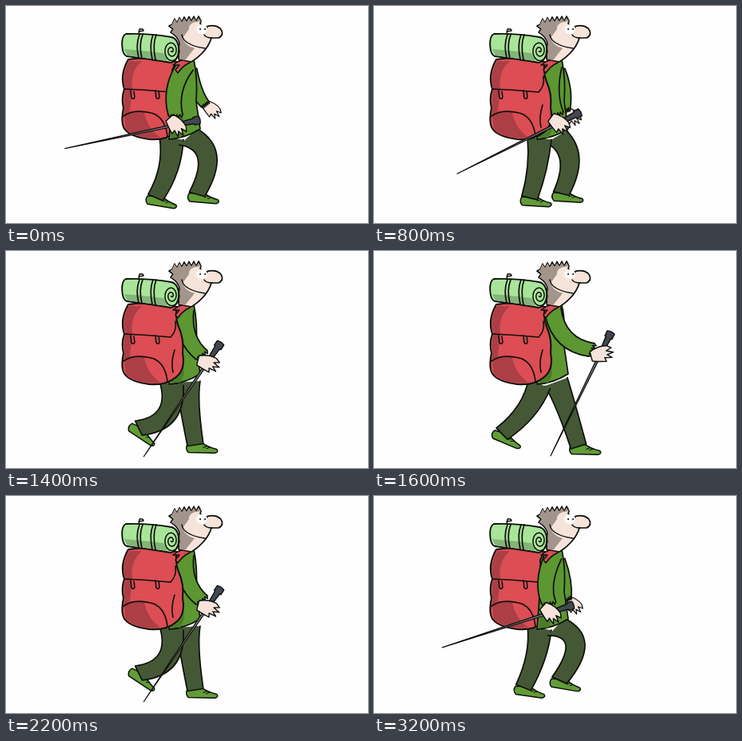
These frames come from a looping animation (453 by 272 pixels, 3400 ms). An HTML page with a canvas:

```html
<!DOCTYPE html>
<html lang="en">
<head>
<meta charset="utf-8">
<title>Hiker</title>
<style>
html, body { margin: 0; width: 100%; height: 100%; overflow: hidden; background: #fefefe; }
canvas { display: block; width: 453px; height: 272px; }
</style>
</head>
<body>
<canvas id="stage" width="453" height="272"></canvas>
<script>
const g = document.getElementById('stage').getContext('2d');
const INK = '#0d0f0b', SKIN = '#f6e4da', SHIRT = '#5c9731', SHADE = '#4a7c28',
  CLOTH = '#445836', SHOE = '#619d36', RED = '#dc4d54', DARK_RED = '#ab3f45',
  MINT = '#a9e599', DARK_MINT = '#83b478', HAIR = '#a3958b';
const RAD = Math.PI / 180, POLE = 171, GRIP = 29;

// Key poses. Legs: knee and ankle. Pole: top end and slope in degrees.
const poses = [
  { back: [203,204, 187,240], front: [252,190, 239,236], elbow: [211,106], pole: [241,143, 12] },
  { back: [203,203, 187,240], front: [256,190, 260,237], elbow: [214,107], pole: [246,139, 16] },
  { back: [202,202, 187,240], front: [252,187, 232,231], elbow: [215,108], pole: [248,137, 18] },
  { back: [206,205, 204,241], front: [236,200, 237,240], elbow: [230,108], pole: [268,130, 37] },
  { back: [201,205, 166,222], front: [230,196, 237,243], elbow: [228,107], pole: [268,116, 56] },
  { back: [190,200, 160,229], front: [241,198, 256,245], elbow: [240,109], pole: [296,103, 64] }
];
// Place of each 200 ms step along the key poses.
const phases = [0, 1, 2, 2.25, 2.45, 3, 3.35, 4, 5, 5];

function poseAt(phase) {
  const i = Math.min(4, Math.floor(phase)), k = phase - i, out = {};
  for (const part in poses[i])
    out[part] = poses[i][part].map((v, n) => v + (poses[i + 1][part][n] - v) * k);
  return out;
}

function paint(path, fill, line = 1.7) {
  if (fill) { g.fillStyle = fill; g.fill(path); }
  if (line) { g.lineWidth = line; g.strokeStyle = INK; g.stroke(path); }
}
const draw = (d, fill, line) => paint(new Path2D(d), fill, line);

function placed(x, y, angle, art) {
  g.save();
  g.translate(x, y);
  g.rotate(angle);
  art();
  g.restore();
}

// Tapered limb through three joints, given the half width at each.
function limb(a, b, c, widths, fill) {
  const side = s => [[a, a, b], [b, a, c], [c, b, c]].map(([p, from, to], i) => {
    const dx = to[0] - from[0], dy = to[1] - from[1], k = s * widths[i] / Math.hypot(dx, dy);
    return [p[0] + dy * k, p[1] - dx * k];
  });
  const bend = ([p, q, r]) => [2 * q[0] - (p[0] + r[0]) / 2, 2 * q[1] - (p[1] + r[1]) / 2];
  const l = side(1), r = side(-1);
  draw(`M${l[0]}Q${bend(l)} ${l[2]}L${r[2]}Q${bend(r)} ${r[0]}`, fill);
}

function leg(hip, [kx, ky, ax, ay]) {
  const lean = Math.atan2(kx - ax, ay - ky) / RAD;
  placed(ax, ay, (3 + Math.max(0, lean - 10) * 0.6) * RAD, () => {
    draw('M-10 0L8-3Q15 2 27 4Q30 7 25 9L-8 10Q-13 6-10 0Z', SHOE, 1.5);
    draw('M10 3L14 1M14 4L18 2', null, 1);
  });
  limb(hip, [kx, ky], [ax, ay], [15, 12, 10], CLOTH);
}

function cuff(x, y, angle, half) {
  placed(x, y, angle, () => {
    const path = new Path2D();
    for (let i = 0; i <= 10; i++) path.lineTo(i % 2 ? 3 : -1, (i / 5 - 1) * half);
    paint(path, SHIRT, 1.4);
  });
}

function hand(x, y, angle, size = 1) {
  placed(x, y, angle, () => {
    g.scale(size, size);
    draw('M-12-6Q0-11 10-8L15-4L8-2L16 2L8 3L13 8L4 6L5 11Q-4 9-12 6Z', SKIN, 1.4);
  });
}

function pole(x, y, slope) {
  placed(x, y, -slope * RAD, () => {
    draw(`M${-POLE} 0L-20-1.6V1.6Z`, '#77757a', 1.2);
    draw('M-22-2.5L-6-3.5V-5H1Q3 0 1 5H-6V3.5L-22 2.5Z', '#414852', 1.4);
  });
}

function torso() {
  draw('M212 72Q224 64 235 67Q240 90 238 120L243 154Q224 166 204 167Q209 110 208 80Z', SHIRT);
  draw('M209 138H221Q226 154 218 165H206Z', SHADE, 0);
}

function pack() {
  draw('M153 67Q180 63 214 70Q211 82 216 95Q223 110 221 128Q225 148 213 158Q200 169 179 167Q156 164 149 155Q143 148 147 128Q144 116 148 104Q142 86 153 67Z', RED, 2);
  draw('M154 69H170Q155 82 158 103L155 132L148 138Q147 122 149 104Q144 88 154 69Z', DARK_RED, 0);
  draw('M148 138Q158 129 173 133Q176 152 193 165Q168 168 150 155Z', DARK_RED, 0);
  draw('M148 104Q176 105 206 108Q214 100 212 88M147 138Q160 128 185 135Q200 142 202 164M211 124Q206 140 209 152', null, 1.6);
  for (const x of [156, 187]) draw(`M${x} 106l1 9q3 3 4-1l-1-7`, null, 1.6);
}

function strap() {
  draw('M209 74Q219 66 229 67L230 71Q221 75 215 84L212 80L217 74Z', RED, 1.4);
}

function roll() {
  draw('M166 37L167 29Q172 28 172 31L166 32', null, 1.5);
  draw('M150 35Q178 34 207 39C220 42 219 69 206 71Q176 66 151 63C144 60 143 38 150 35Z', MINT, 1.9);
  draw('M148 54Q174 56 197 59L202 69L152 62Z', DARK_MINT, 0);
  for (const x of [167, 171, 184, 188])
    draw(`M${x} 36q-5 13-1 ${29 + (x - 167) / 10}`, null, 1.7);
  const coil = new Path2D();
  for (let a = 0; a < 15; a += 0.3)
    coil.lineTo(207 + Math.cos(a) * (10 - a * 0.62), 56 + Math.sin(a) * (14 - a * 0.9));
  paint(coil, null, 1.5);
}

function head() {
  let spikes = '';
  for (let i = 0; i <= 12; i++) spikes += `L${208 + i * 3} ${(i % 2 ? 13 : 19) + 4 * (1 - i / 12) ** 3}`;
  draw(`M206 33L209 29L204 25${spikes}L243 22L248 27Q260 22 268 28Q274 36 266 40L257 40Q252 57 232 70L216 67L217 46Q215 38 206 33Z`, SKIN);
  draw(`M207 33L210 29L206 25${spikes.replace(/13/g, '15')}Q228 20 229 29L221 40Q224 50 236 53L224 68L217 66L218 46Q215 37 207 33Z`, HAIR, 0);
  draw('M246 27Q250 29 252 27M258 40Q250 40 248 36M220 36Q222 49 249 53', null, 1.5);
  draw('M238 29a7 6 0 1 0 14 0a7 6 0 1 0-14 0', '#fff', 0);
  for (const x of [243, 249]) draw(`M${x} 29h.1`, null, 2);
}

function render(phase) {
  const p = poseAt(phase), armBack = phase < 2.4;
  const [px, py, slope] = p.pole, [ex, ey] = p.elbow;
  const hx = px - GRIP * Math.cos(slope * RAD), hy = py + GRIP * Math.sin(slope * RAD);
  const aim = Math.atan2(hy - ey, hx - ex);
  const wx = hx - 12 * Math.cos(aim), wy = hy - 12 * Math.sin(aim);
  g.fillStyle = '#fefefe';
  g.fillRect(0, 0, 453, 272);
  g.lineJoin = g.lineCap = 'round';

  if (phase < 3.2) {
    const fx = 257 - 4 * phase, fy = 129 + 3.5 * phase;
    hand(fx, fy, 0.65, 0.85);
    limb([232, 80], [239, 106], [fx - 8, fy - 6], [7, 7, 6], SHIRT);
    cuff(fx - 8, fy - 6, 0.9, 6);
  }
  const legs = [() => leg([207, 166], p.back), () => leg([228, 164], p.front)];
  if (!armBack) legs.reverse();
  legs.forEach(f => f());

  const arm = () => {
    limb([224, 76], [ex, ey], [wx, wy], [11, 10, 9], SHIRT);
    cuff(wx, wy, aim, 9);
  };
  (armBack ? [pack, torso, arm] : [torso, arm, pack]).forEach(f => f());
  strap();
  pole(...p.pole);
  hand(hx, hy, aim - 0.7);
  head();
  roll();
}

function tick(now) {
  const i = Math.floor(now % 3400 / 200);
  render(phases[i > 9 ? 18 - i : i]);
  requestAnimationFrame(tick);
}
tick(0);
</script>
</body>
</html>
```
